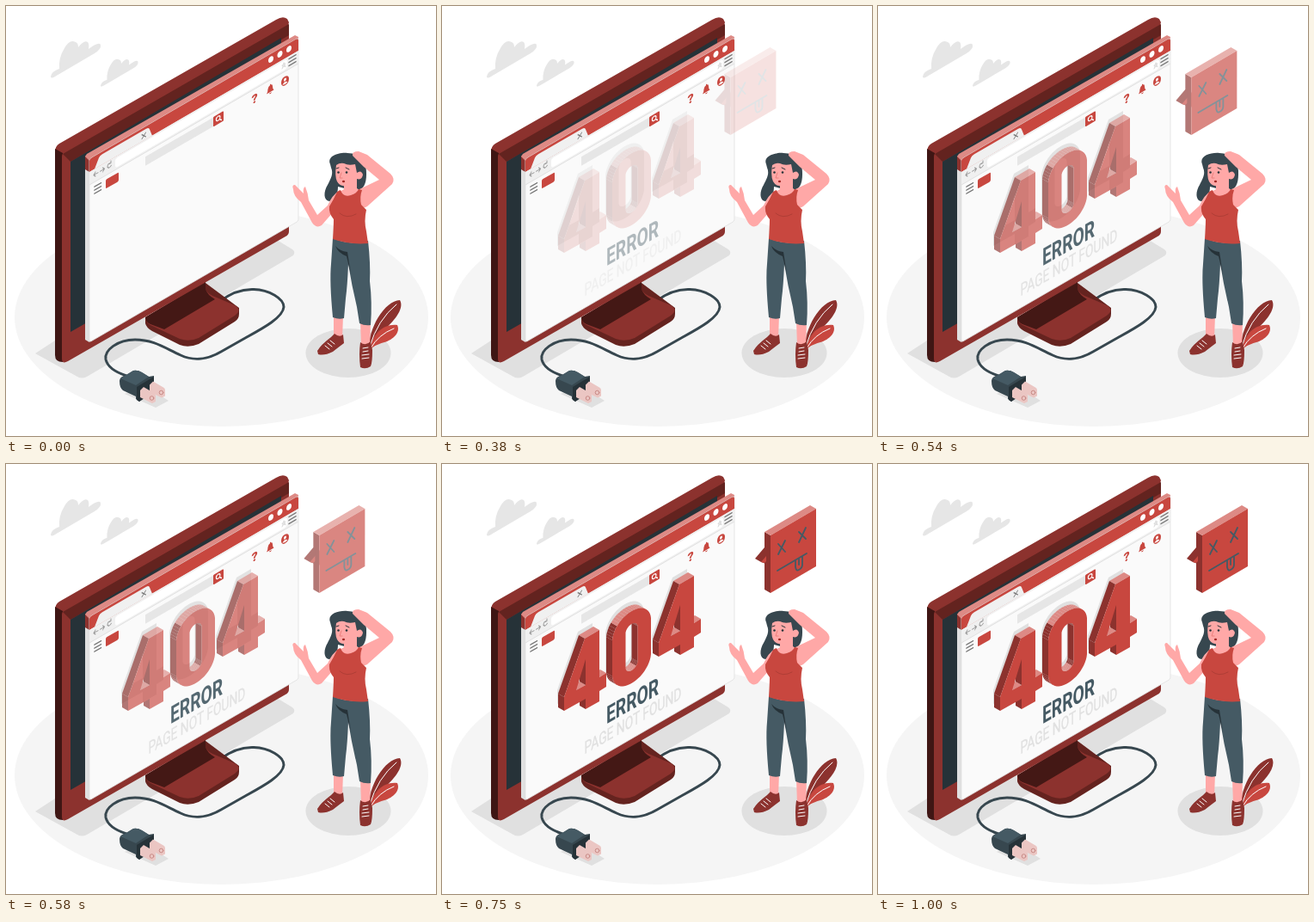
Recreate the animation shown at these times as an HTML page. Size 500 by 500 pixels, loop 1040 ms.

```html
<!DOCTYPE html>
<html lang="en">
<head>
<meta charset="utf-8">
<title>404 error</title>
<style>
  html, body { margin: 0; width: 100%; height: 100%; overflow: hidden; background: #fff; }
  svg { display: block; width: 100%; height: 100%; }
  text { font-family: Roboto, "Open Sans", sans-serif; }
  .line { fill: none; stroke-linecap: round; stroke-linejoin: round; }
</style>
</head>
<body>
<svg viewBox="0 0 500 500">
  <defs>
    <path id="cloud" fill="#e6e6e6" d="M52 82Q53 76 62 73Q61 60 68 49Q74 38 81 42Q84 43 84 48Q91 39 95 42Q97 44 96 50Q108 41 110 45Q111 50 103 55L57 82Q52 85 52 82Z"/>
  </defs>

  <ellipse cx="250.5" cy="362" rx="240.5" ry="127" fill="#f5f5f5"/>
  <use href="#cloud"/>
  <use href="#cloud" transform="translate(71 31) scale(.75)"/>
  <path fill="#e0e0e0" d="M34 404L60 387L305 266L333 283Q337 286 334 290L94 431Q88 434 83 431Z"/>

  <g id="cable">
    <path class="line" stroke="#37474f" stroke-width="3" d="M248 344C262 333 275 329 288 329.500C306 330 323 340 323 350C322 362 300 374 280 385L250 402C235 411 218 413 203 406C185 398 172 388 150 388C130 388 114 400 116 411C118 420 128 426 140 430"/>
    <path fill="#e0e0e0" d="M138 451L174 467L189 459L160 440Z"/>
    <path fill="#37474f" d="M132 436Q132 431 140 429L148 424Q153 423 158 426L166 431L172 430V442L155 460L151 457V454L136 447Q132 444 132 436Z"/>
    <path fill="#455a64" d="M133 433L148 424Q153 423 158 426L166 431L151 441Z"/>
    <path fill="#263238" d="M152 443L172 431V449L155 460L152 458Z"/>
    <g id="prong">
      <path fill="#ebc6c3" d="M156 447L160 443L172 450Q174 451 174 453V460L170 462L156 455Z"/>
      <circle class="line" cx="169.500" cy="456" r="2.300" stroke="#c98a86"/>
    </g>
    <use href="#prong" x="11" y="-6.500"/>
  </g>

  <g id="stand">
    <path fill="#65231f" d="M162 362V369Q163 374 170 378L202 394Q212 398 224 393L266 367Q271 364 271 358V351L232 322Z"/>
    <path fill="#8c322e" d="M162 362L232 320V329Q234 335 245 339L266 348Q275 353 266 360L224 386Q213 391 202 387L168 371Q162 368 162 362Z"/>
    <path fill="#441815" d="M162 362L232 320V329Q234 336 243 341L184 376L168 370Q162 367 162 362Z"/>
  </g>

  <g id="monitor">
    <path fill="#8c322e" d="M57 170Q57 163 62 160L314 16Q322 11 327 15L329 19L326 30L70 176Z"/>
    <path fill="#3f1614" d="M57 166L66 171V414Q57 414 57 406Z"/>
    <path fill="#8c322e" d="M65 175Q65 171 70 168L322 22Q329 19 329 26V262Q329 266 325 268L72 413Q65 417 65 410Z"/>
    <path fill="#63231f" d="M66 172L329 21V34L75 181Z"/>
    <path fill="#263238" d="M75 181L320 37V239L75 379Z"/>
  </g>

  <g id="browser">
    <path fill="#e0e0e0" d="M92 174L97 178V391L92 388Z"/>
    <path fill="#8c322e" d="M92 174L97 178V193L92 190Z"/>
    <path fill="#dd8a85" d="M92 175L94 172L336 34L340 36V39L97 180Z"/>
    <g transform="matrix(1 -.58 0 1 97 178)">
      <rect width="243" height="213" rx="2" fill="#fafafa" stroke="#e0e0e0" stroke-width=".7"/>
      <path fill="#c8473f" d="M0 15V2Q0 0 3 0H240Q243 0 243 3V15Z"/>
      <rect y="15" width="243" height="15" fill="#f0f0f0"/>
      <path fill="#f0f0f0" d="M6 15L11 5Q12 3 15 3H66Q69 3 70 6L73 15Z"/>
      <rect x="30" y="17" width="200" height="11" rx="3" fill="#fff"/>
      <path d="M0 30H243" stroke="#e0e0e0"/>
      <g fill="#fff">
        <ellipse cx="211" cy="6.500" rx="3" ry="3.500"/>
        <ellipse cx="221.500" cy="6.500" rx="3" ry="3.500"/>
        <ellipse cx="232" cy="6.500" rx="3" ry="3.500"/>
      </g>
      <g class="line" stroke="#777" stroke-width="1">
        <path d="M61 7L65.500 12M65.500 7L61 12"/>
        <path stroke="#999" d="M10 21.500H5M7 19L5 21.500L7 24M12.500 21.500H17.500M15.500 19L17.500 21.500L15.500 24M25 19Q21 17 21 21.500Q23 25 25.500 22M25 16.500V19H23"/>
        <path stroke="#777" stroke-width="1.500" d="M232 18H240M232 22H240M232 26H240M6 35.500H13.500M6 39.500H13.500M6 43.500H13.500"/>
        <path stroke="#ddd" d="M226 19L228 25L224 21H228L224 25Z"/>
      </g>
      <rect x="65" y="35" width="80" height="10.500" fill="#e6e6e6"/>
      <g fill="#c8473f">
        <rect x="144" y="34.500" width="12" height="11.500" rx="1"/>
        <rect x="19" y="35" width="15" height="10.500" rx="1.500"/>
        <text x="188.500" y="46" font-size="14" font-weight="900">?</text>
        <path d="M206 44Q207.500 42 207.500 39Q208 36 210 36V35H211V36Q213 36 213 39Q213 42 214.500 44ZM209 45H212Q210.500 47.500 209 45Z"/>
        <ellipse cx="227.500" cy="41" rx="4.500" ry="5.200"/>
      </g>
      <path class="line" stroke="#fff" stroke-width="1.200" d="M152 39.500A2.300 2.500 0 1 1 147.400 39.500A2.300 2.500 0 1 1 152 39.500M151.500 41.500L153.500 43.500"/>
      <path fill="#fff" d="M226 39.500A1.500 1.800 0 1 1 229 39.500A1.500 1.800 0 1 1 226 39.500M224.500 44Q227.500 40 230.500 44Q227.500 46 224.500 44"/>
    </g>
  </g>

  <g id="message">
    <g id="shadows" fill="#e0e0e0" fill-rule="evenodd"></g>
    <text transform="matrix(.69 -.397 0 1 191 302.500)" font-size="28" font-weight="700" fill="#455a64">ERROR</text>
    <text transform="matrix(.69 -.397 0 1 165.500 337.500)" font-size="20" fill="#e0e0e0" stroke="#e0e0e0" stroke-width=".4">PAGE NOT FOUND</text>
  </g>
  <g id="digits" fill-rule="evenodd"></g>

  <g id="bubble">
    <path fill="#8c322e" d="M364 110L375 97L382 100V118L371 114Z"/>
    <path fill="#c8473f" d="M371 114L383 100V117Z"/>
    <path fill="#8c322e" d="M375 79L382 83V150L375 146V115L377 113V99L375 98Z"/>
    <path fill="#dd8a85" d="M375 79L428 48L435 52L382 83Z"/>
    <path fill="#c8473f" d="M382 83L435 52V119L382 150Z"/>
    <path class="line" stroke="#455a64" stroke-width="1.800" d="M391 93L399 102M399 89L391 105M415 79L423 87M423 74L415 91M390 124L424 104M411 112V120Q412 125 415 123Q419 121 419 117V107M415 110V117"/>
  </g>

  <g id="woman">
    <ellipse cx="398" cy="403.500" rx="49.500" ry="28.500" fill="#e0e0e0"/>
    <path fill="#8c322e" d="M422 400C421 375 440 343 458 342C464 352 450 368 438 378C428 386 424 392 422 400Z"/>
    <path fill="#c8473f" d="M423 401C426 380 440 369 455 371C459 380 450 388 440 391C430 394 426 396 423 401Z"/>
    <path class="line" stroke="#fff" d="M423 396Q432 365 454 347M424 398Q433 382 451 375"/>

    <g fill="#ffa8a7">
      <path d="M381 360H392L391 387L381 386Z"/>
      <path d="M412 366H424L423 396L413 396Z"/>
    </g>
    <path fill="#8c322e" d="M362 401Q366 394 378 385L382 381Q388 386 392 382L393 392Q385 398 380 402Q370 407 363 405ZM412 391Q418 396 424 390L426 400Q426 415 424 419Q418 423 412 420Q410 405 412 391Z"/>
    <path class="line" stroke="#fff" stroke-width="1" d="M377 389L382 393M374 392L379 396M371 395L376 399M415 398L421 397M415 402L421 401M414 406L422 405M414 410L422 409"/>
    <path fill="#455a64" d="M380 270Q400 279 421 273Q424 300 423 320Q426 345 424 371Q417 372 411 369L408 350Q402 325 398 300Q397 325 395 340L393 363Q387 365 380 362Q376 320 378 300Z"/>
    <path fill="#263238" d="M383 279Q388 285 397 286L401 312L396 291Q386 287 383 279Z"/>

    <path fill="#37474f" d="M377 184C373 175 386 170 397 171C412 171 420 182 419 196C419 206 416 213 408 216L386 210C386 218 383 226 376 227C369 226 369 216 374 208C378 200 381 195 378 188Z"/>
    <path fill="#ffa8a7" d="M411 213L434 202L416 187Q410 181 403 174Q402 169 410 169L420 173L447 195Q453 201 449 207L420 233Q412 238 411 228Z"/>
    <path fill="#ffa8a7" d="M388 214Q379 220 374 232L362 243L352 226Q351 217 348 210Q345 211 346 218L336 208Q332 208 334 213Q334 221 343 228L356 252Q361 259 367 255L381 239L390 226Z"/>
    <path fill="#ffa8a7" d="M393 201L408 198V212L414 216L409 225H390L388 216L393 213Z"/>
    <path fill="#c8473f" d="M385 216L389 214Q392 223 401 220Q408 218 410 213L414 214Q411 222 413 231L419 237Q416 250 419 262L421 276Q400 278 380 271Q381 255 381 248Q375 241 376 233Q381 225 385 216Z"/>
    <path class="line" stroke="#a93b34" stroke-width=".8" d="M388 241Q396 248 407 242"/>
    <path fill="#ffa8a7" d="M384 185Q382 198 385 204Q388 210 395 209Q405 207 408 201Q414 203 415 196Q413 190 408 194L406 184Q398 186 393 183Q388 182 384 185Z"/>
    <g fill="#263238"><circle cx="386.500" cy="193.500" r="1.300"/><circle cx="396" cy="193.500" r="1.300"/></g>
    <path class="line" stroke="#263238" d="M384 189L387 188M395 188L399 190"/>
    <path class="line" stroke="#e57773" stroke-width=".8" d="M390 194L388 200L391 200"/>
    <ellipse cx="392.500" cy="204" rx="1.600" ry="1.200" fill="#a02724"/>
  </g>
</svg>

<script>
const LOOP = 1040, STEP = 1000 / 24, SLOPE = .575;
const DEPTH = [7, 4];
const byId = id => document.getElementById(id);
const clamp = v => Math.max(0, Math.min(1, v));
const toPath = pts => 'M' + pts.map(p => p.map(n => n.toFixed(1)).join(' ')).join('L') + 'Z';

function addPath(parent, d, fill) {
  const path = document.createElementNS('http://www.w3.org/2000/svg', 'path');
  path.setAttribute('d', d);
  if (fill) path.setAttribute('fill', fill);
  parent.appendChild(path);
}

// Outer outlines run clockwise, holes the other way.
function ring(w, h, direction) {
  return Array.from({ length: 48 }, (_, i) => {
    const a = direction * (i + .5) * Math.PI / 24;
    const u = w * Math.cos(a);
    const v = w * Math.sin(a) + Math.sign(Math.sin(a)) * (h - w);
    return [220.5 + u, 213 + v - SLOPE * u];
  });
}

function four(dx, dy) {
  const outer = [[276, 140], [293, 130], [293, 185], [301, 180], [301, 196], [293, 201],
    [293, 213], [277, 222], [277, 210], [252, 224], [252, 208]];
  const hole = [[277, 164], [266, 200], [277, 194]];
  return [outer, hole].map(pts => pts.map(([x, y]) => [x + dx, y + dy]));
}

function drawSides(parent, pts) {
  const [dx, dy] = DEPTH;
  pts.forEach(([x, y], i) => {
    const [x2, y2] = pts[(i + 1) % pts.length];
    const length = Math.hypot(x2 - x, y2 - y);
    const nx = (y2 - y) / length, ny = (x - x2) / length;
    if (nx * dx + ny * dy >= 0) return;
    const quad = [[x, y], [x2, y2], [x2 - dx, y2 - dy], [x - dx, y - dy]];
    addPath(parent, toPath(quad), ny < -.5 ? '#dd8a85' : '#8c322e');
  });
}

function drawDigit(outlines) {
  const shadow = outlines.map(pts => pts.map(([x, y]) => [x - 8, y - 8]));
  addPath(byId('shadows'), shadow.map(toPath).join(''));
  outlines.forEach(pts => drawSides(byId('digits'), pts));
  addPath(byId('digits'), outlines.map(toPath).join(''), '#c8473f');
}

drawDigit(four(-110, 63));
drawDigit([ring(22.5, 42, 1), ring(7, 27, -1)]);
drawDigit(four(0, 0));

// Slides in to its furthest point, then settles back a little.
function bubbleShift(step) {
  if (step <= 18) return -1.24 * (18 - step) ** 1.65;
  return -2.5 * (1 - Math.cos(Math.PI * (step - 18) / 6));
}

function render(time) {
  const step = Math.floor((time % LOOP + 2) / STEP);
  const solid = clamp((step - 7.75) / 8);
  byId('message').setAttribute('opacity', clamp((step - 5.75) / 8));
  byId('digits').setAttribute('opacity', solid);
  byId('bubble').setAttribute('opacity', solid);
  byId('bubble').setAttribute('transform', `translate(${bubbleShift(step).toFixed(2)} 0)`);
}

const start = performance.now();
function tick() {
  render(performance.now() - start);
  requestAnimationFrame(tick);
}
tick();
</script>
</body>
</html>
```
